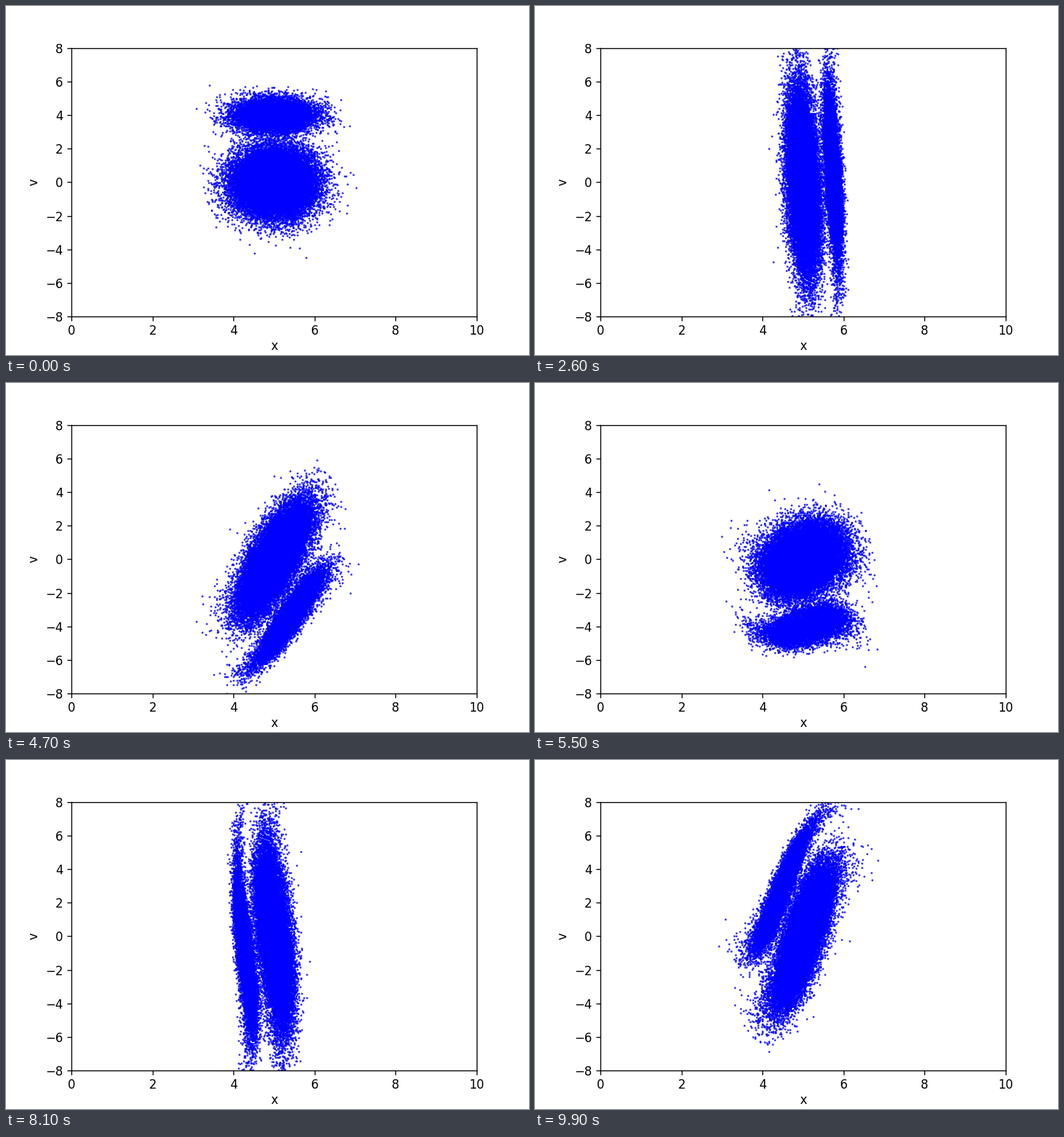
Write a matplotlib script that moves like this. It is 720x480 px and loops after 10000 ms.

```python
import numpy as np
import matplotlib.pyplot as plt
from matplotlib.animation import FuncAnimation

FRAMES, INTERVAL = 100, 100
CENTER = 5.0
OMEGA = 5.4                  # ratio of speed to displacement amplitude
STEP = np.radians(3.10)      # phase advance per frame at small amplitude
STIFFEN = 0.022              # relative speed-up with squared amplitude

rng = np.random.default_rng(7)


def bunch(n, v_mean, v_sigma):
    return rng.normal(0, 0.5, n), rng.normal(v_mean, v_sigma, n)


x0, v0 = np.hstack([bunch(25000, 0, 1.0), bunch(10000, 4, 0.5)])
u0 = v0 / OMEGA
amp = np.hypot(x0, u0)
phase = np.arctan2(x0, u0)
rate = STEP * (1 + STIFFEN * np.minimum(amp, 2) ** 2)

plt.rcParams["font.family"] = "DejaVu Sans"
fig, ax = plt.subplots(figsize=(6, 4), dpi=120)
ax.set(xlim=(0, 10), ylim=(-8, 8))
ax.tick_params(axis="x", pad=2.9)
ax.set_xlabel("x", labelpad=2)
ax.set_ylabel("v")
dots, = ax.plot([], [], "b.", ms=1.5, alpha=0.7)


def draw(i):
    angle = phase + rate * i
    dots.set_data(CENTER + amp * np.sin(angle), OMEGA * amp * np.cos(angle))
    return dots,


anim = FuncAnimation(fig, draw, frames=FRAMES, interval=INTERVAL,
                     repeat=True, repeat_delay=0)
plt.show()
```
